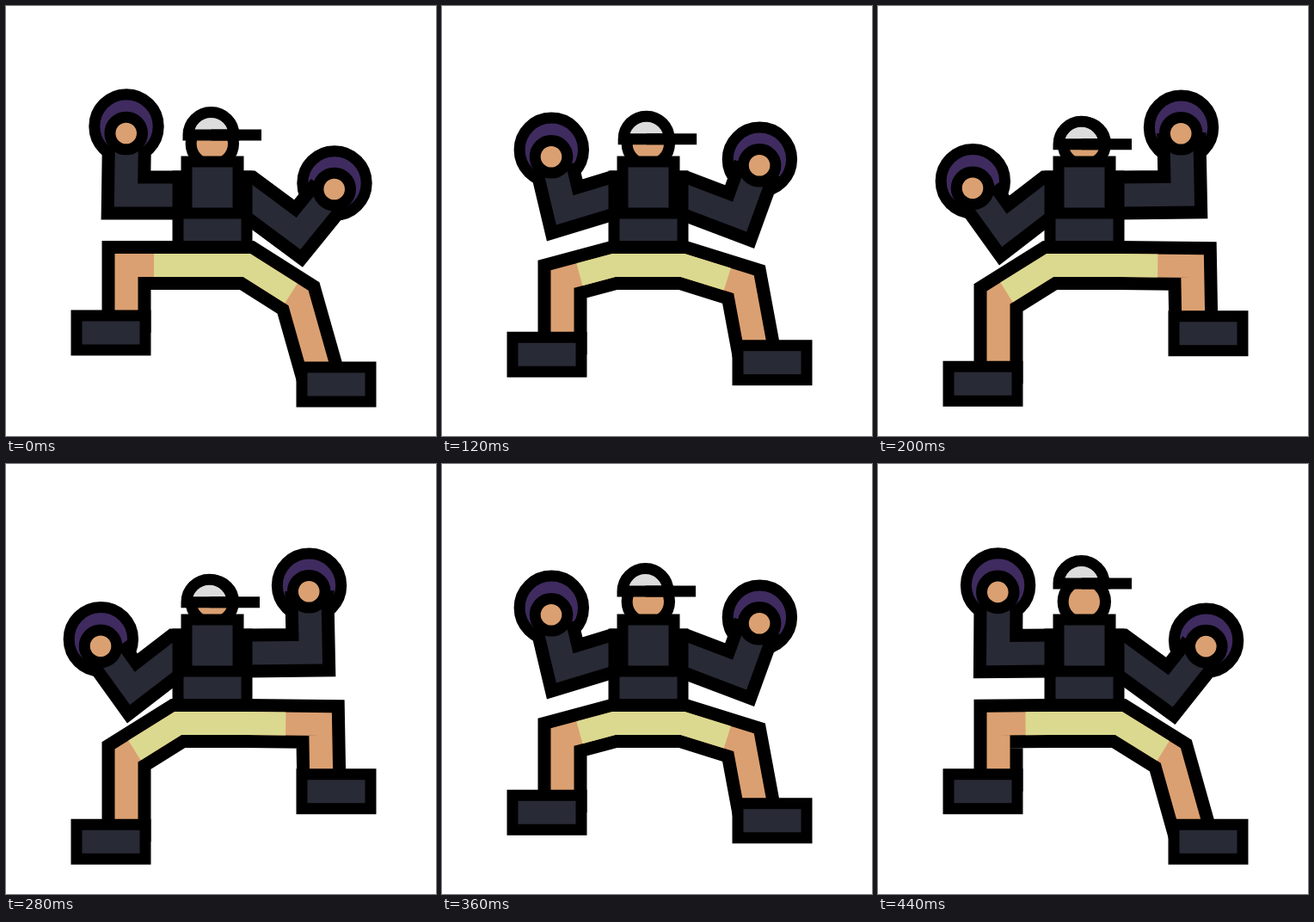
An HTML page with a canvas for the animation above (0.48 s loop, 500 by 500 pixels).

```html
<!DOCTYPE html>
<html lang="en">
<head>
<meta charset="utf-8">
<title>Dancer</title>
<style>
  html, body { margin: 0; height: 100%; overflow: hidden; background: #fff; }
  canvas { display: block; }
</style>
</head>
<body>
<canvas id="stage" width="500" height="500"></canvas>
<script>
const ctx = document.getElementById('stage').getContext('2d');
const DARK = '#282a36', SKIN = '#dba071', SHORTS = '#dbd98f', PLATE = '#3f2b5f', CAP = '#dcdcdc';
const STEP = 40, STEPS = 12, LINE = 13;

const mix = (a, b, p) => a + (b - a) * p;
const mixPoint = (a, b, p) => [mix(a[0], b[0], p), mix(a[1], b[1], p)];

// Steep ease in and out: cubic-bezier(.922, 0, .098, 1)
function ease(x) {
  const bezier = (a, b, s) => 3 * a * s * (1 - s) ** 2 + 3 * b * s * s * (1 - s) + s ** 3;
  let low = 0, high = 1;
  for (let i = 0; i < 30; i++) {
    const mid = (low + high) / 2;
    if (bezier(.922, .098, mid) < x) low = mid; else high = mid;
  }
  return x === 0 || x === 1 ? x : bezier(0, 1, low);
}

function polyline(points, width, color) {
  ctx.beginPath();
  points.forEach(([x, y]) => ctx.lineTo(x, y));
  ctx.lineWidth = width;
  ctx.strokeStyle = color;
  ctx.stroke();
}

function limb(points, color) {
  polyline(points, 57, '#000');
  polyline(points, 27, color);
}

function paint(color) {
  ctx.fillStyle = color;
  ctx.fill();
  ctx.lineWidth = LINE;
  ctx.strokeStyle = '#000';
  ctx.stroke();
}

function box(x, y, w, h) {
  ctx.beginPath();
  ctx.rect(x, y, w, h);
  paint(DARK);
}

function disc([x, y], r, color) {
  ctx.beginPath();
  ctx.arc(x, y, r, 0, 7);
  paint(color);
}

function along(from, to, distance) {
  const length = Math.hypot(to[0] - from[0], to[1] - from[1]);
  return mixPoint(from, to, distance / length);
}

function drawArms(p) {
  const leftHand = mixPoint([139.7, 148], [109.6, 212.7], p);
  const rightHand = mixPoint([381.7, 213], [351.8, 147.3], p);
  disc([leftHand[0] + .3, leftHand[1] - 8], 37.2, PLATE);
  disc([rightHand[0] + .3, rightHand[1] - 7], 37.2, PLATE);
  limb([
    mixPoint([140.3, 163], [118, 222], p),
    mixPoint([139.5, 220], [147, 261.5], p),
    [200, 220], [280, 220],
    mixPoint([340, 264.5], [354.5, 218.5], p),
    mixPoint([377, 219], [352.5, 146.5], p)
  ], DARK);
  disc(leftHand, 18.8, SKIN);
  disc(rightHand, 18.8, SKIN);
}

function drawLegs(p) {
  const leftHip = [200, 301.5], rightHip = [280, 301.5];
  const leftKnee = mixPoint([140, 301.5], [140, 339.5], p);
  const rightKnee = mixPoint([340, 339.5], [366, 302], p);
  const leftFoot = mix(360, 420, p), rightFoot = mix(420, 360, p);
  limb([
    [140, leftFoot + 20], leftKnee, leftHip,
    rightHip, rightKnee, [mix(368.5, 367, p), rightFoot + 20]
  ], SKIN);
  polyline([
    along(leftHip, leftKnee, mix(28, 60, p)), leftHip,
    rightHip, along(rightHip, rightKnee, mix(61, 45, p))
  ], 27, SHORTS);
  box(82, leftFoot, 80, 40);
  box(344, rightFoot, 80, 40);
}

function drawCap(x, y) {
  ctx.beginPath();
  ctx.arc(x, y, 26.5, Math.PI, 0);
  ctx.closePath();
  paint(CAP);
  polyline([[x, y], [x + 58.5, y]], LINE, '#000');
}

function draw(now) {
  const step = Math.floor(now / STEP) % STEPS;
  const half = STEPS / 2;
  const falling = step <= half;
  const p = ease(Math.min(step, STEPS - step) / half);

  ctx.fillStyle = '#fff';
  ctx.fillRect(0, 0, 500, 500);
  drawArms(p);
  box(200, 198, 80, 82);
  drawLegs(p);
  disc([239.8, 160], 24.7, SKIN);
  box(210, 181, 60, 60);
  // The cap drops a little, then flies up higher than it started
  drawCap(falling ? 238.5 - 2 * p : 236.5, mix(falling ? 150 : 138.7, 161, p));
}

const start = performance.now();
(function loop() {
  draw(performance.now() - start);
  requestAnimationFrame(loop);
})();
</script>
</body>
</html>
```
